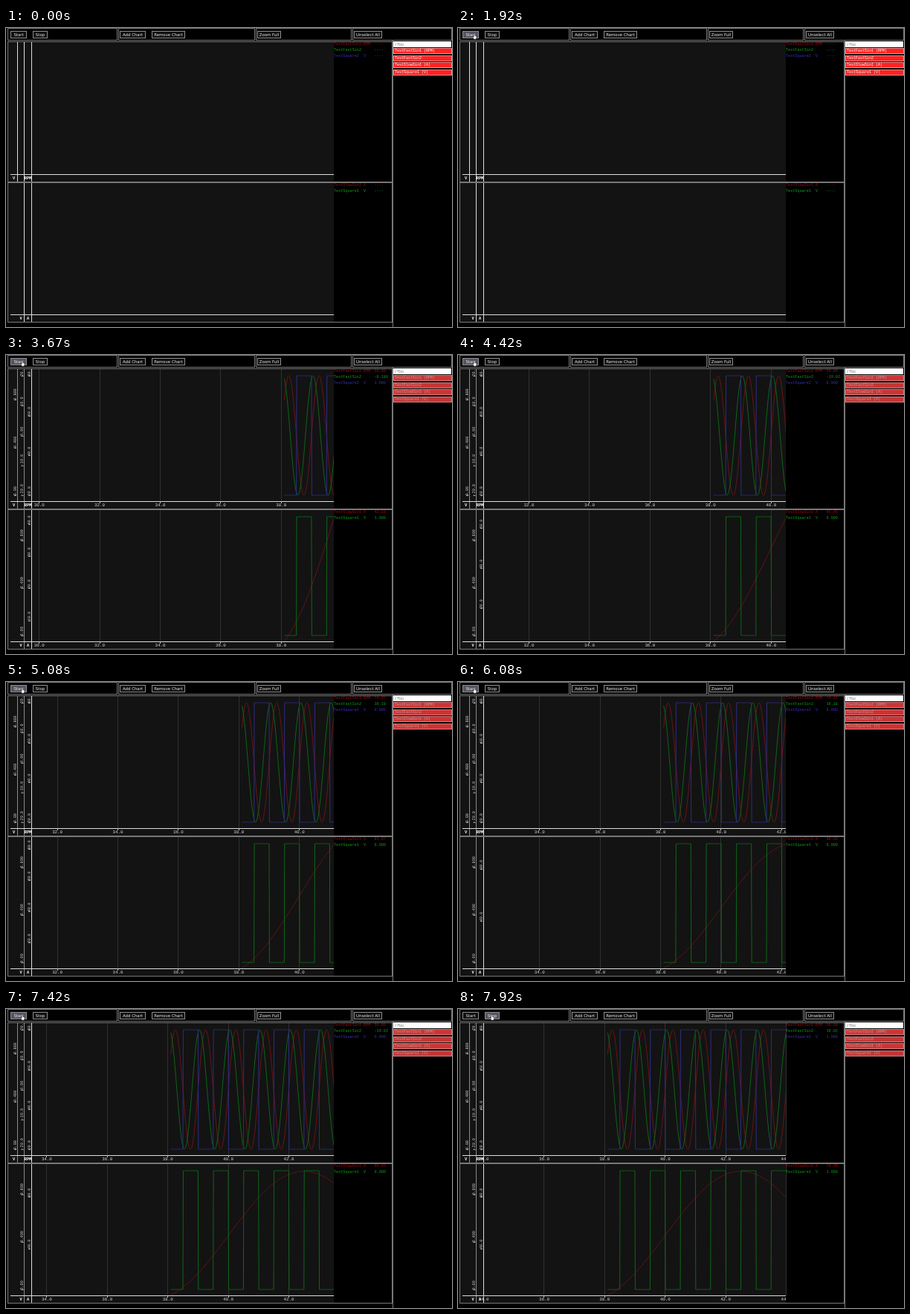
Recreate the animation shown at these times as an HTML page with a canvas. Size 600 by 403 pixels, loop 8 s.

```html
<!DOCTYPE html>
<html lang="en">
<head>
<meta charset="utf-8">
<title>Live charts</title>
<style>
html, body { margin: 0; width: 100%; height: 100%; overflow: hidden; background: #000; }
canvas { display: block; }
</style>
</head>
<body>
<canvas id="stage" width="600" height="403"></canvas>
<script>
const ctx = document.getElementById('stage').getContext('2d');
const MONO = '"Liberation Mono", monospace';
const LOOP = 8000, FPS = 12, FIRST_STEP = 25;
const LEFT = 34, RIGHT = 441, SPAN = 10, PX = (RIGHT - LEFT) / SPAN;
const DATA_START = 38.1, SAMPLE = 0.05;
const TAU = Math.PI * 2;
const BORDER = '#787878';

const square = s => ((s - 0.001) % 1 >= 0.5 ? 1 : 0);
const square1 = { name: 'TestSquare1', unit: 'V', f: square, low: 0.053, pad: () => 0.053 };
// The fast curves nearly touch the top until their range is first extended.
const latePad = now => (now < 39.04 ? 0.005 : 0.053);

const charts = [
  { top: 19, bottom: 197, signals: [
    { name: 'TestFastSin1', unit: 'RPM', f: s => 50 + 30 * Math.sin(TAU * s), low: 0.053, pad: latePad, axis: 2 },
    { name: 'TestFastSin2', unit: '', f: s => 20 * Math.cos(TAU * (s - 0.05)), low: 0.053, pad: latePad, axis: 1 },
    { ...square1, name: 'TestSquare2', axis: 0 }] },
  { top: 209, bottom: 386, signals: [
    { name: 'TestSlowSin1', unit: 'A', f: s => 50 + 50 * Math.sin(TAU * (s - 40) / 10), low: 0.005, pad: () => 0.055, axis: 2 },
    { ...square1, axis: 1 }] }
];
const inks = [
  { line: '#6c1317', text: '#a00a0a' },
  { line: '#0f6618', text: '#0fa018' },
  { line: '#2d2d82', text: '#3632bc' }
];
const buttons = [
  ['Start', 6, 22], ['Stop', 36, 20], ['Add Chart', 153, 35],
  ['Remove Chart', 196, 45], ['Zoom Full', 338, 32], ['Unselect All', 468, 38]
];
const listItems = ['TestFastSin1 (RPM)', 'TestFastSin2', 'TestSlowSin1 (A)', 'TestSquare1 (V)'];

function rect(x, y, w, h, color) {
  ctx.fillStyle = color;
  ctx.fillRect(x, y, w, h);
}

function frame(x, y, w, h, color) {
  ctx.strokeStyle = color;
  ctx.lineWidth = 1;
  ctx.strokeRect(x + 0.5, y + 0.5, w - 1, h - 1);
}

function text(str, x, y, font, color, align = 'left') {
  ctx.font = font;
  ctx.fillStyle = color;
  ctx.textAlign = align;
  ctx.textBaseline = 'middle';
  ctx.fillText(str, x, y);
}

function clipped(x, y, w, h, draw) {
  ctx.save();
  ctx.beginPath();
  ctx.rect(x, y, w, h);
  ctx.clip();
  draw();
  ctx.restore();
}

const timeToX = (s, now) => RIGHT + 0.5 - (now - s) * PX;

function eachTimeTick(now, visit) {
  for (let n = Math.ceil((now - SPAN) / 2 - 0.001) * 2; n <= now; n += 2) {
    visit(n, timeToX(n, now));
  }
}

function rangeOf(signal, now) {
  let min = Infinity, max = -Infinity;
  for (let s = DATA_START; s <= now + 0.001; s += SAMPLE) {
    const v = signal.f(s);
    min = Math.min(min, v);
    max = Math.max(max, v);
  }
  const size = max - min || 1;
  return { lo: min - signal.low * size, hi: max + signal.pad(now) * size };
}

function tickStep(size) {
  for (let unit = 0.001; ; unit *= 10) {
    for (const m of [1, 2, 4]) if (size / (m * unit) <= 4.7) return m * unit;
  }
}

// Three significant digits for axes, four for the legend.
function digits(v, count) {
  const a = Math.abs(v) < 1e-6 ? 0 : Math.abs(v);
  const whole = a >= 100 ? 3 : a >= 9.9999 ? 2 : 1;
  const decimals = count - whole + (count === 3 && a > 0 && a < 1 ? 1 : 0);
  return (a && v < 0 ? '-' : '') + a.toFixed(decimals);
}

const axisX = signal => LEFT - (2 - signal.axis) * 9.5;

function drawYTicks(chart, signal, range, toY) {
  const edge = axisX(signal);
  const step = tickStep(range.hi - range.lo);
  clipped(3, chart.top, 38, chart.bottom - chart.top + 1, () => {
    for (let n = Math.ceil(range.lo / step); n * step <= range.hi; n++) {
      const y = toY(n * step);
      rect(edge - 4, Math.round(y), 3, 1, '#aaa');
      ctx.save();
      ctx.translate(edge - 2.7, y + 0.5);
      ctx.rotate(-Math.PI / 2);
      text(digits(n * step, 3), 0, 0, '5.1px ' + MONO, '#ccc');
      ctx.restore();
    }
  });
}

function drawCurve(chart, signal, toY, now, color) {
  clipped(LEFT + 1, chart.top, RIGHT - LEFT - 1, chart.bottom - chart.top + 1, () => {
    ctx.beginPath();
    const count = Math.round((now - DATA_START) / 0.01);
    for (let i = 0; i <= count; i++) {
      const s = DATA_START + i * 0.01;
      ctx.lineTo(timeToX(s, now), toY(signal.f(s)));
    }
    ctx.strokeStyle = color;
    ctx.lineWidth = 1;
    ctx.stroke();
  });
}

function drawChart(chart, running, now) {
  const { top, bottom, signals } = chart;
  rect(3, top, RIGHT - 3, bottom - top + 10, '#131313');

  if (running) {
    eachTimeTick(now, (n, x) => rect(Math.floor(x), top, 1, bottom - top, '#303030'));
  }

  signals.forEach((signal, i) => {
    const y = top + 3 + i * 7.9;
    text(signal.name.padEnd(13) + signal.unit, RIGHT, y, '5.15px ' + MONO, inks[i].text);
    text(running ? digits(signal.f(now), 4) : '----', 495.5, y, '5.15px ' + MONO, inks[i].text);
    if (!running) return;
    const range = rangeOf(signal, now);
    const toY = v => bottom + 0.5 - (v - range.lo) / (range.hi - range.lo) * (bottom - top);
    drawYTicks(chart, signal, range, toY);
    drawCurve(chart, signal, toY, now, inks[i].line);
  });

  for (const signal of signals) {
    const x = axisX(signal);
    const color = running && signal.axis < 2 ? '#8a8a8a' : '#ddd';
    rect(Math.floor(x), top, 1, bottom - top + 10, color);
    text(signal.unit, x - 4.5, bottom + 5.3, 'bold 5.3px ' + MONO, '#fff', 'center');
  }
  rect(6, bottom, RIGHT - 6, 1, '#ddd');

  if (running) {
    clipped(3, bottom, RIGHT - 3, 10, () => eachTimeTick(now, (n, x) => {
      rect(Math.floor(x), bottom, 1, 3, '#bbb');
      text(n.toFixed(1), x, bottom + 5, '5.8px ' + MONO, '#ddd', 'center');
    }));
  }
  frame(2, top - 1, 518, bottom - top + 12, BORDER);
}

function cursorAt(t) {
  if (t < 1496) return null;
  const enter = Math.min(1, (t - 1496) / 167);
  const move = Math.max(0, Math.min(1, (t - 7496) / 417));
  const ease = move * move * (3 - 2 * move);
  return { x: 22 + 23.5 * ease, y: 4 + 4 * enter };
}

function drawCursor({ x, y }) {
  ctx.beginPath();
  ctx.moveTo(x - 0.6, y);
  ctx.lineTo(x + 0.6, y);
  ctx.lineTo(x + 0.8, y + 2.6);
  ctx.lineTo(x + 3, y + 3.4);
  ctx.lineTo(x + 2.4, y + 7);
  ctx.lineTo(x - 0.6, y + 7);
  ctx.lineTo(x - 2.2, y + 4);
  ctx.lineTo(x - 0.7, y + 4.2);
  ctx.closePath();
  ctx.fillStyle = '#fff';
  ctx.fill();
  ctx.strokeStyle = '#222';
  ctx.lineWidth = 0.4;
  ctx.stroke();
}

function drawToolbar(cursor) {
  for (const [a, b] of [[2, 150], [151, 335], [336, 465], [466, 600]]) {
    frame(a, 0, b - a, 17, BORDER);
  }
  for (const [label, x, w] of buttons) {
    const hover = cursor && cursor.x >= x && cursor.x <= x + w;
    rect(x, 4, w, 10, hover ? '#555560' : '#101010');
    frame(x, 4, w, 10, '#8c8c8c');
    text(label, x + w / 2, 9.3, '5.4px "DejaVu Sans", sans-serif', '#e4e4e4', 'center');
  }
}

function drawList(running) {
  rect(520, 17, 1, 386, BORDER);
  rect(521, 18, 78, 8, '#fff');
  text('rfbo', 523, 22.3, '5px ' + MONO, '#777');
  listItems.forEach((item, i) => {
    const y = Math.round(27 + i * 9.6);
    rect(521, y, 79, 8, running ? '#cb3434' : '#ff2222');
    frame(521, y, 79, 8, running ? '#d87878' : '#f59090');
    text(item, 523, y + 4, '5px ' + MONO, running ? '#b8a0a0' : '#fff');
  });
}

function draw(t) {
  const step = Math.floor((t + 4) * FPS / 1000);
  const running = step >= FIRST_STEP;
  const clock = 44 + (step - 95) / FPS;
  // The right edge sits on the newest sample.
  const now = Math.floor(clock / SAMPLE + 0.001) * SAMPLE;
  const cursor = cursorAt(step * 1000 / FPS);
  rect(0, 0, 600, 403, '#000');
  drawToolbar(cursor);
  for (const chart of charts) drawChart(chart, running, now);
  drawList(running);
  if (cursor) drawCursor(cursor);
}

const began = performance.now();
function tick() {
  draw((performance.now() - began) % LOOP);
  requestAnimationFrame(tick);
}
tick();
</script>
</body>
</html>
```
